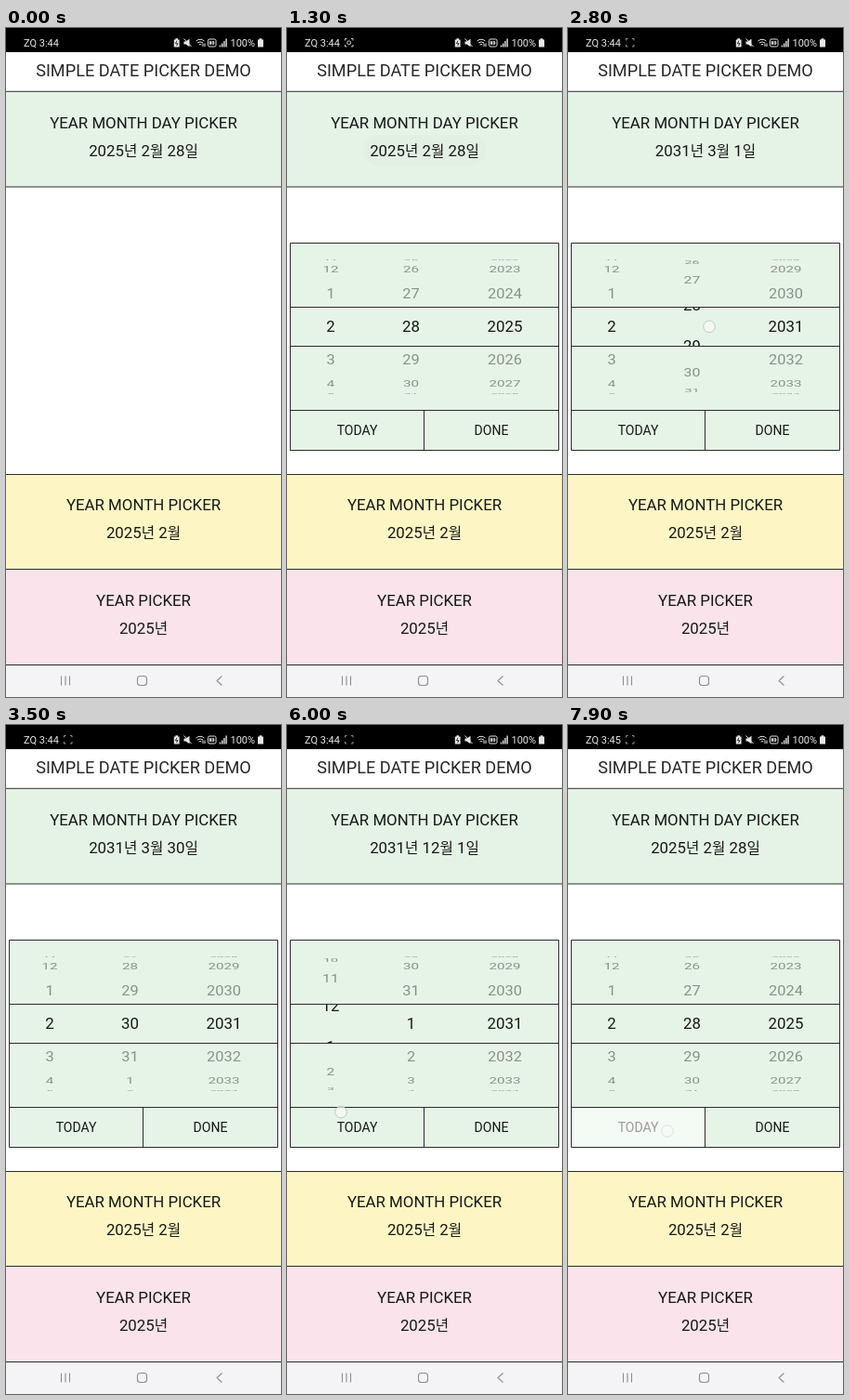
These frames come from a looping animation (296 px wide and 720 px high, 8000 ms). An HTML page:

```html
<!DOCTYPE html>
<html lang="ko">
<head>
<meta charset="utf-8">
<title>Simple date picker demo</title>
<style>
  html, body { margin: 0; width: 100%; height: 100%; overflow: hidden; background: #fff; }
  svg { display: block; width: 296px; height: 720px; }
  text { font: 16.85px Roboto, sans-serif; fill: #161816; text-anchor: middle; white-space: pre; }
  .ko { font-family: 'Noto Sans CJK KR', 'Noto Sans CJK', sans-serif; font-size: 15.6px; font-weight: 500; }
  .bar text { font-size: 11px; fill: #e8e8e8; text-anchor: start; }
  text.title { font-size: 18.15px; fill: #262626; }
  text.btn { font-size: 14px; }
  .rule { stroke: #2b2b2b; fill: none; }
  .ico { stroke: #e4e4e4; fill: none; }
  .solid { fill: #e8e8e8; }
  .nav { stroke: #8d8d90; fill: none; stroke-width: 1.1; }
</style>
</head>
<body>
<svg viewBox="0 0 296 720" xmlns="http://www.w3.org/2000/svg">
  <defs>
    <clipPath id="band"><rect x="4" y="300" width="288" height="42.5"/></clipPath>
    <clipPath id="around"><path d="M4 232H292V300H4ZM4 342.5H292V411H4Z"/></clipPath>
  </defs>
  <rect width="296" height="720" fill="#fff"/>
  <rect y="68.5" width="296" height="102.5" fill="#e5f3e7"/>
  <rect y="480.5" width="296" height="102" fill="#fdf6c4"/>
  <rect y="582.5" width="296" height="103" fill="#fae3ea"/>
  <path class="rule" d="M0 68.3H296M0 171H296M0 480.5H296M0 582.5H296M0 685.5H296"/>

  <text class="title" x="148" y="51.5">SIMPLE DATE PICKER DEMO</text>
  <text x="148" y="108">YEAR MONTH DAY PICKER</text>
  <rect id="pill" x="82" y="115" width="133" height="33" rx="16.5" fill="#556"/>
  <text id="date" x="148" y="137.5"></text>
  <text x="148" y="519">YEAR MONTH PICKER</text>
  <text id="yearMonth" x="148" y="549"></text>
  <text x="148" y="622">YEAR PICKER</text>
  <text id="year" x="148" y="652"></text>

  <g id="sheet">
    <rect x="3.5" y="231.5" width="289" height="223" fill="#fff"/>
    <path d="M4 232H292V454H148V411H4Z" fill="#e6f4e7"/>
    <g id="today">
      <rect x="4" y="411" width="143" height="43" fill="#e6f4e7"/>
      <text class="btn" x="75.5" y="438">TODAY</text>
    </g>
    <text class="btn" x="220" y="438">DONE</text>
    <g id="dim" clip-path="url(#around)" opacity=".45"></g>
    <g id="lit" clip-path="url(#band)"></g>
    <path class="rule" d="M3.5 231.5H292.5V454.5H3.5ZM4 300.5H292M4 342.5H292M4 411.5H292M147.5 411V454"/>
  </g>

  <rect y="686" width="296" height="34" fill="#f4f4f6"/>
  <g class="nav">
    <path d="M59.5 697.5v10m4.5 -10v10m4.5 -10v10M232.5 697.5l-5.5 5l5.5 5"/>
    <rect x="141.5" y="697.5" width="10" height="10" rx="3"/>
  </g>

  <g class="bar">
    <rect width="296" height="26" fill="#000"/>
    <text id="clock" x="19" y="19.5"></text>
    <g id="scan" class="ico">
      <rect x="62.5" y="11.5" width="8.5" height="8.5" stroke-dasharray="2 4.5 2 0" stroke-dashoffset="0"/>
      <circle id="dot" cx="66.7" cy="15.8" r="2"/>
    </g>
    <path class="solid" d="M180.8 12.5h1.6v-1.2h2.6v1.2h1.6v8h-5.8Z"/>
    <path d="M184 13.7l-1.6 3h2.6l-1.5 2.5" stroke="#000" stroke-width=".8" fill="none"/>
    <path class="solid" d="M191.5 14.5h2l4 -2.7v8.4l-4 -2.7h-2Z"/>
    <path class="ico" d="M191.5 11.5l8 8.5M204.5 14q4.5 -3.5 9 0M206 16q3 -2.2 6 0M207.6 18q1.4 -1 2.8 0M212 16.5v3.5m2 -3.5v3.5"/>
    <rect class="ico" x="217.5" y="12" width="8.5" height="8" rx="1.5"/>
    <path class="ico" d="M219.5 14v4m1.5 -4v4m-1.5 -2h1.5M223 14v4q2 -2 0 -4"/>
    <path class="ico" d="M230.5 20.5v-2m2.2 2v-4m2.2 4v-6.5m2.2 6.5v-9" stroke-width="1.4"/>
    <text x="241.5" y="19.5">100%</text>
    <path class="solid" d="M271 12.5h1.6v-1.2h2.8v1.2h1.6v8h-6Z"/>
  </g>
  <circle id="touch" r="6.3" fill="#f8f9f8" fill-opacity=".72" stroke="#bfc3c0" stroke-width=".9"/>
</svg>
<script>
const LOOP = 8000, STEP = 100, RESET = 7800;
const ROW = 36, CENTER = 321.3, RADIUS = 72, TILT = 29.5 * Math.PI / 180;

const $ = id => document.getElementById(id);
const set = (el, attrs) => { for (const k in attrs) el.setAttribute(k, attrs[k]); };
const wrap = (v, n) => ((v - 1) % n + n) % n + 1;
const ramp = (t, start, length) => Math.min(1, Math.max(0, (t - start) / length));
const smooth = u => u * u * (3 - 2 * u);

// A finger rests for `hold`; its wheel travels `rows` during `glide`.
const gestures = [
  { x: 187, y: 131, at: 300, hold: 500 },
  { wheel: 'year', x: 264, y: 340, at: 1800, hold: 300, rows: 6, glide: 750 },
  { wheel: 'day', x: 152, y: 340, at: 2600, hold: 400, rows: 2, glide: 600 },
  { wheel: 'day', x: 187, y: 311, at: 3600, hold: 600, rows: 3, glide: 667 },
  { wheel: 'day', x: 157, y: 300, at: 4600, hold: 400, rows: -1, glide: 500 },
  { wheel: 'month', x: 58, y: 360, at: 5500, hold: 600, rows: -5, glide: 1340 },
  { x: 107, y: 437, at: 7400, hold: 400 }
];
const moved = (g, t) => g.wheel ? g.rows * smooth(ramp(t, g.at, g.glide)) : 0;

const wheels = {
  month: { x: 47, first: 2, size: 12 },
  day: { x: 133.5, first: 28, size: 31 },
  year: { x: 234.5, first: 2025, size: Infinity }
};

function addRow(layer) {
  return $(layer).appendChild(document.createElementNS('http://www.w3.org/2000/svg', 'text'));
}
for (const w of Object.values(wheels)) {
  w.rows = Array.from({ length: 9 }, () => ({ dim: addRow('dim'), lit: addRow('lit') }));
}

function position(name, t) {
  const { first } = wheels[name];
  if (t >= RESET) return first;
  return gestures.filter(g => g.wheel === name).reduce((sum, g) => sum + moved(g, t), first);
}

function place(el, x, y, sx, sy, visible) {
  set(el, {
    visibility: visible ? 'visible' : 'hidden',
    transform: `translate(${x} ${y}) scale(${sx} ${sy}) translate(0 6)`
  });
}

// Rows lie on a cylinder; the lit band magnifies their distance from the centre.
function drawWheel({ x, size, rows }, pos) {
  rows.forEach(({ dim, lit }, i) => {
    const value = Math.round(pos) + i - 4, offset = value - pos;
    const angle = offset * TILT, cos = Math.max(0, Math.cos(angle));
    const sx = 1 - 0.21 * (1 - cos), sy = Math.max(0.1, cos ** 0.85 * sx);
    const dy = RADIUS * Math.sin(angle), far = Math.abs(offset);
    place(dim, x, CENTER + dy, sx, sy, far > 0.6 && far * TILT < 1.56);
    place(lit, x, CENTER + dy * 1.2, sx, sy, far < 0.9);
    dim.textContent = lit.textContent = size < Infinity ? wrap(value, size) : value;
  });
}

function label(id, s) {
  $(id).innerHTML = s.replace(/[년월일]/g, c => `<tspan class="ko">${c}</tspan>`);
}

function drawTouch(t) {
  const g = gestures.find(g => t >= g.at && t < g.at + g.hold + 200);
  if (!g) return set($('touch'), { opacity: 0 });
  const lift = g.at + g.hold;
  set($('touch'), {
    cx: g.x,
    cy: g.y - ROW * moved(g, Math.min(t, lift)),
    opacity: 1 - ramp(t, lift, 200)
  });
}

function draw(t) {
  const pos = {};
  for (const name in wheels) drawWheel(wheels[name], pos[name] = position(name, t));

  // 29 February rolls over to 1 March in the label only.
  const month = Math.round(pos.month), day = Math.round(pos.day);
  const shownMonth = month === 2 && day > 28 ? 3 : wrap(month, 12);
  const shownDay = day === 29 ? 1 : wrap(day, 31);
  label('date', `${Math.round(pos.year)}년 ${shownMonth}월 ${shownDay}일`);

  const rise = 655 * (1 - ramp(t, 800, 428)) ** 3;
  set($('sheet'), { transform: `translate(0 ${Math.round(rise)})` });
  set($('pill'), { opacity: 0.085 * (ramp(t, 200, 300) - ramp(t, 900, 480)) });
  set($('today'), { opacity: 1 - 0.8 * (ramp(t, 7400, 100) - ramp(t, RESET, 350)) });

  const scanning = t >= 1100 && t < 1600;
  set($('scan'), { opacity: t < 300 ? 0 : scanning ? 0.9 : 0.65 });
  set($('dot'), { opacity: scanning ? 1 : 0 });
  $('clock').textContent = `ZQ 3:${t < 7100 ? 44 : 45}`;
  drawTouch(t);
}

label('yearMonth', '2025년 2월');
label('year', '2025년');

const start = performance.now();
function tick() {
  const t = (performance.now() - start) % LOOP;
  draw(Math.floor(t / STEP) * STEP);
  requestAnimationFrame(tick);
}
draw(0);
requestAnimationFrame(tick);
</script>
</body>
</html>
```
